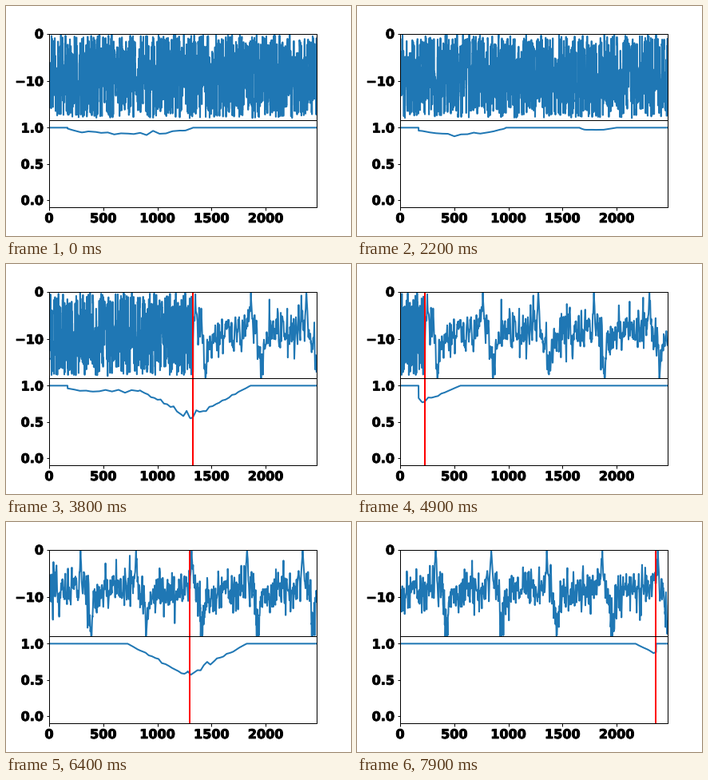
A matplotlib script for the animation above (8 s loop, 432x288 px).

```python
import numpy as np
import matplotlib.pyplot as plt
from matplotlib import patheffects
from matplotlib.animation import FuncAnimation

plt.rcParams.update({
    "font.family": "DejaVu Sans", "font.weight": "bold", "font.size": 16,
    "lines.linewidth": 2, "axes.linewidth": 1,
    "xtick.major.width": 1, "ytick.major.width": 1,
})

FRAMES, STEP, WIN = 80, 100, 2470
PERIOD = 513
SEGMENT = 5 * PERIOD
START = 2 * SEGMENT          # uniform noise gives way to the periodic signal
TOTAL = WIN + STEP * FRAMES
rng = np.random.default_rng(7)
x = np.arange(WIN)
t = np.arange(TOTAL)


def rough(n, step):
    """Gaussian noise joined by straight lines every `step` samples."""
    knots = np.arange(0, n + step, step)
    return np.interp(np.arange(n), knots, rng.normal(size=len(knots)))


def bump(v, center, width):
    return np.exp(-((v - center) / width) ** 2)


def make_stream():
    """Static, then a beat: a sharp spike, a trough and a slow rise."""
    phase = (t - START - 22) % PERIOD
    near = np.minimum(phase, PERIOD - phase)
    beat = -9.3 + 1.2 * phase / PERIOD
    beat += 8.2 * np.exp(-near / 16) - 5.5 * bump(phase, 97, 24)
    noise = 1.5 * rough(PERIOD, 5)[phase] + 2 * rough(TOTAL, 5)
    late = t >= START + SEGMENT
    noise += late * bump(phase, 85, 38) * 2 * rough(TOTAL, 2)
    wave = beat + noise * np.clip(0.3 + near / 30, 0, 1)
    static = np.repeat(rng.uniform(-17.8, -0.1, TOTAL // 2), 2)
    return np.clip(np.where(t < START, static, wave), -18.3, -0.05)


stream = make_stream()
wiggle = 1 + 0.05 * rough(TOTAL, 30)

# Shallow jagged dips that come and go while the static lasts
swell = np.clip(np.sin(2 * np.pi * (t - 280) / 1850) + 0.4, 0, 1)
drift = 0.08 * swell ** 0.6 * (1 + 0.25 * rough(TOTAL, 60)) * (t < START)


def change_point(n):
    for k in range(3):
        pos = START + k * SEGMENT - STEP * n
        if 0 <= pos < WIN:
            return pos
    return 0


def score(n):
    view = slice(STEP * n, STEP * n + WIN)
    dip = drift[view] * np.clip((2000 - x) / 300, 0, 1)
    pos = change_point(n)
    room = min(pos, WIN - pos)
    if room:
        # The valley at the change is limited by the nearer window edge
        depth = 0.44 * min(1, room / 600) ** 0.7
        half = min(550, 1.5 * room)
        valley = depth * np.clip(1 - np.abs(x - pos + 20) / half, 0, 1)
        dip = np.maximum(dip, valley * wiggle[view])
    return 1 - np.where((x > 170) & (x < 2365), dip, 0)


fig, (top, low) = plt.subplots(2, sharex=True, figsize=(6, 4), dpi=72)
fig.subplots_adjust(left=0.125, right=0.9, bottom=0.125, top=0.88, hspace=0)
top.set(xlim=(0, WIN), ylim=(-18.3, 0), yticks=[-10, 0])
low.set(ylim=(-0.1, 1.1), yticks=[0, 0.5, 1], xticks=range(0, 2001, 500))
top.tick_params(bottom=False)

heavy = [patheffects.withStroke(linewidth=0.9, foreground="black")]
for label in [*top.get_yticklabels(), *low.get_yticklabels(),
              *low.get_xticklabels()]:
    label.set_path_effects(heavy)

signal, = top.plot(x, stream[:WIN], color="C0")
curve, = low.plot(x, score(0), color="C0")
marks = [ax.axvline(0, color="red") for ax in (top, low)]


def update(n):
    signal.set_ydata(stream[STEP * n:STEP * n + WIN])
    curve.set_ydata(score(n))
    pos = change_point(n)
    for m in marks:
        m.set_xdata([pos, pos])
    return [signal, curve, *marks]


anim = FuncAnimation(fig, update, frames=FRAMES, interval=100, repeat=True,
                     repeat_delay=0, blit=False)
plt.show()
```
